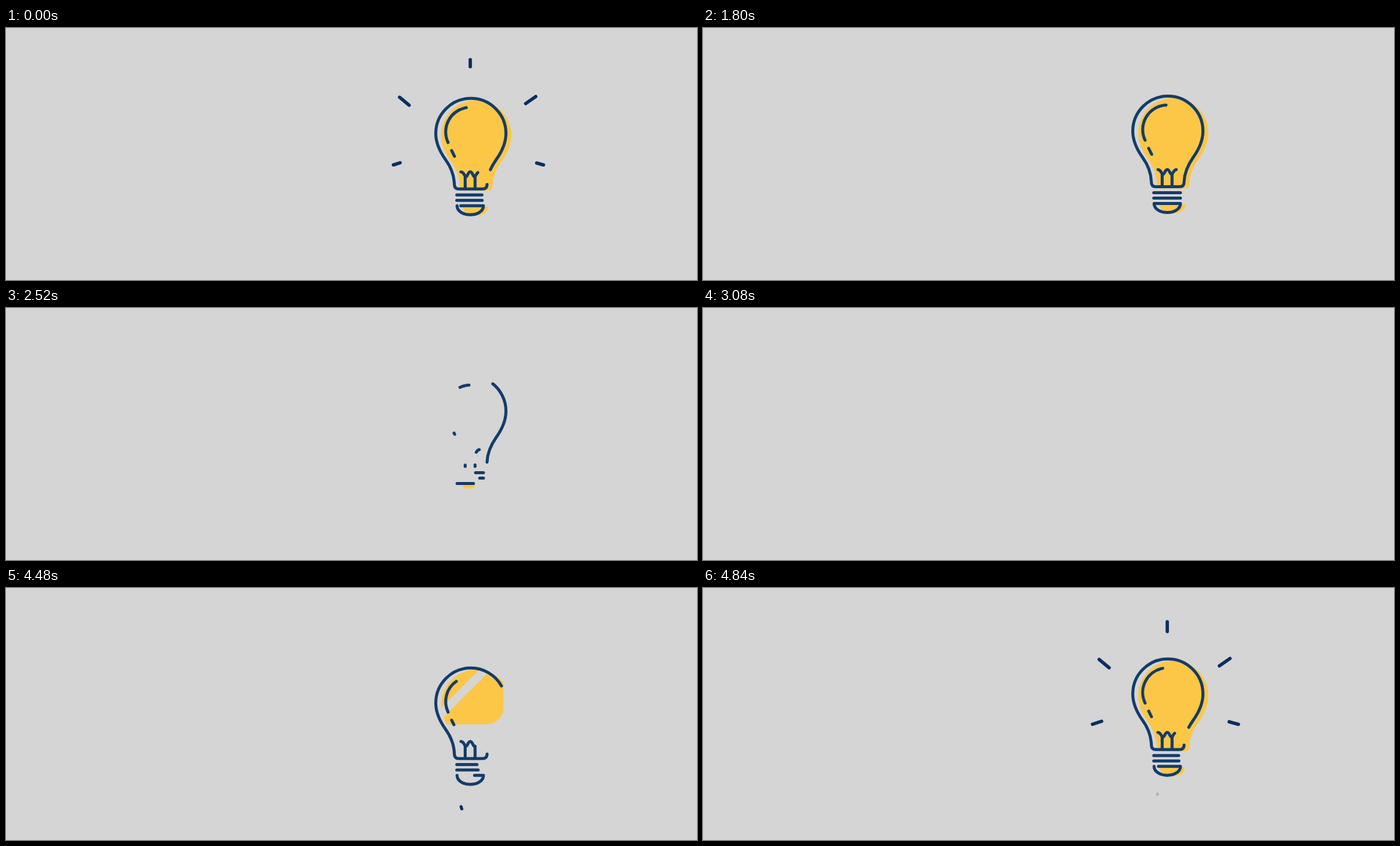
These frames come from a looping animation (1152x420 px, 4.88 s). An HTML page:

```html
<!DOCTYPE html>
<html lang="en">
<head>
<meta charset="utf-8">
<title>Light bulb</title>
<style>
  html, body { margin: 0; width: 100%; height: 100%; overflow: hidden; background: #d5d5d5; }
  svg { display: block; width: 100vw; height: 100vh; }
  .lines path { fill: none; stroke: #143c69; stroke-width: 5; stroke-linecap: round; stroke-linejoin: round; }
  .lines .spark { stroke: #0a2f5e; stroke-width: 5.6; }
  .lines .swirl { stroke: #0a2f5e; }
  .glow { fill: #fcc747; }
  .wipe { fill: none; stroke: #fff; stroke-width: 9.4; stroke-linecap: round; }
</style>
</head>
<body>
<svg viewBox="0 0 1152 420">
  <defs>
    <path id="glass" d="M802 257 Q802 264.5 794.5 264.5 H755 Q747.5 264.5 747.5 257 C747 241 741 227 733 216 C723 202 716.5 188 716.5 172 A58.5 58.5 0 0 1 833.5 172 C833.5 188 827 202 817 216 C808 229 802.5 241 802 257"/>
    <mask id="glassMask" maskUnits="userSpaceOnUse" x="600" y="0" width="400" height="420">
      <rect id="block" x="300" y="-300" rx="28" fill="#fff"/>
      <path d="M0 0H925L0 925Z"/>
      <path id="band" fill="#fff"/>
      <path id="sweep"/>
    </mask>
    <mask id="cupMask" maskUnits="userSpaceOnUse" x="700" y="270" width="150" height="60">
      <path id="upper" class="wipe" pathLength="1" d="M764 296H803"/>
      <path id="lower" class="wipe" pathLength="1" d="M764 305H803"/>
    </mask>
  </defs>
  <g id="bulb">
    <g mask="url(#glassMask)"><use class="glow" href="#glass" x="9" y="3"/></g>
    <g mask="url(#cupMask)"><path class="glow" d="M761 294H805C804 304 793 309.5 783 309.5S762 304 761 294Z"/></g>
    <g id="strokes" class="lines"></g>
  </g>
  <g id="extras" class="lines"></g>
</svg>
<script>
const LOOP = 4880, DRAW = 3920, ERASE = 1800, GONE = 3080;
const $ = id => document.getElementById(id);

// Cubic-bezier easing over a span of time
function ease(t, start, length, [x1, y1, x2, y2]) {
  const x = (t - start) / length;
  if (x <= 0) return 0;
  if (x >= 1) return 1;
  const at = (u, a, b) => 3 * (1 - u) ** 2 * u * a + 3 * (1 - u) * u * u * b + u ** 3;
  let lo = 0, hi = 1;
  for (let i = 0; i < 24; i++) {
    const mid = (lo + hi) / 2;
    if (at(mid, x1, x2) < x) lo = mid; else hi = mid;
  }
  return at(lo, y1, y2);
}

function addPath(parent, d, name) {
  const el = document.createElementNS("http://www.w3.org/2000/svg", "path");
  el.setAttribute("d", d);
  el.setAttribute("pathLength", 1);
  if (name) el.setAttribute("class", name);
  parent.append(el);
  return el;
}

function trim(el, from, to) {
  const shown = to > from;
  el.style.visibility = shown ? "visible" : "hidden";
  if (!shown) return;
  el.style.strokeDasharray = `${to - from} 9`;
  el.style.strokeDashoffset = -from;
}

const SOFT = [.3, 0, .1, 1];
const POST = [.25, .1, .25, 1];
// path, draw easing, draw length, last x of the erase easing
const strokes = [
  [$("glass").getAttribute("d"), SOFT, 1440, .45],
  ["M737 187A41 41 0 0 1 772 128.5", SOFT, 1440, .25],
  ["M743 200.5L748 210.5", [.2, 0, .1, 1], 1440, .27],
  ["M765.5 244V264", POST, 800, .05],
  ["M782 244V264", POST, 860, .08],
  ["M758.5 236C764 236 764 244 767 244C770 243 770 236 774 236C778 236 778 243 781 244C784 243 784 237 789 236", [.15, 0, .1, 1], 1440, .15],
  ["M751.5 274.5H796", [.15, 0, .1, 1], 1440, .4],
  ["M751.5 283.5H796", [.02, 0, .05, 1], 1440, .13],
  ["M752 292.5C752 302 763 307.5 774 307.5S796 302 796 292.5H752", SOFT, 1440, .36]
].map(([d, curve, length, last]) => ({ el: addPath($("strokes"), d), curve, length, last }));

const shortRay = { head: [4600, 600, [.3, .5, .3, 1]], tail: [4680, 500, [.3, 0, .3, 1]] };
const longRay = { head: [4630, 600, [.3, .5, .3, 1]], tail: [4660, 560, [.4, .3, .6, 1]] };
const rays = [
  ["M774 95V44", shortRay],
  ["M686 215L637.5 231", shortRay],
  ["M855.5 217L904.5 230.5", shortRay],
  ["M695 148L645 106", longRay],
  ["M842 143L895 106", longRay]
].map(([d, move]) => ({ el: addPath($("extras"), d, "spark"), move }));

const swirl = addPath($("extras"),
  "M781 367.5C796 362 809 373 791 381C781 388 770 388 763 374.5Q759 368 758 361Q756 350 758.5 339", "swirl");

const corner = c => `M0 0H${c}L0 ${c}Z`;

function render(t) {
  // Drawing runs past the end of the loop, so early times count as late ones
  const d = t < ERASE ? t + LOOP : t;
  const drawing = d >= DRAW;
  const off = s => ease(t, ERASE, GONE - ERASE, [.5, 0, s, 1]);

  const drop = drawing ? 74 * (1 - ease(d, DRAW, 1400, SOFT)) : 0;
  $("bulb").setAttribute("transform", `translate(0 ${drop})`);

  for (const { el, curve, length, last } of strokes) {
    if (drawing) trim(el, 0, Math.max(.001, ease(d, DRAW, length, curve)));
    else trim(el, off(last), t < GONE ? 1 : 0);
  }

  for (const { el, move } of rays) {
    trim(el, drawing ? ease(d, ...move.tail) : 0, drawing ? ease(d, ...move.head) : 0);
  }

  const head = drawing && d < LOOP ? ease(d, 3960, 1240, SOFT) : 0;
  trim(swirl, Math.min(ease(d, 4240, 640, [.3, .3, .2, 1]), head - .005), head);
  swirl.style.opacity = Math.min(1, Math.max(0, (4900 - d) / 300));

  const right = drawing ? Math.min(900, 829 + (d - 4480) * .4) : 900;
  $("block").setAttribute("width", Math.max(0, right - 300));
  $("block").setAttribute("height", Math.max(0, right - 322));
  const edge = drawing ? 905 + (d - 4480) * (d < 4480 ? .78 : .3) : 1200;
  $("band").setAttribute("d", corner(Math.max(0, Math.min(1200, edge))));
  $("sweep").setAttribute("d", corner(drawing ? 0 : 780 + 320 * ease(t, ERASE, 640, [.45, 0, .6, 1])));

  const fill = ease(d, 4500, 860, [.2, .6, .1, 1]);
  trim($("upper"), 0, drawing ? fill : 1 - off(.45));
  trim($("lower"), 0, drawing ? fill : 1 - ease(t, ERASE, 700, [.5, 0, .45, 1]));
}

const begin = performance.now();
function tick() {
  render((performance.now() - begin) % LOOP);
  requestAnimationFrame(tick);
}
tick();
</script>
</body>
</html>
```
